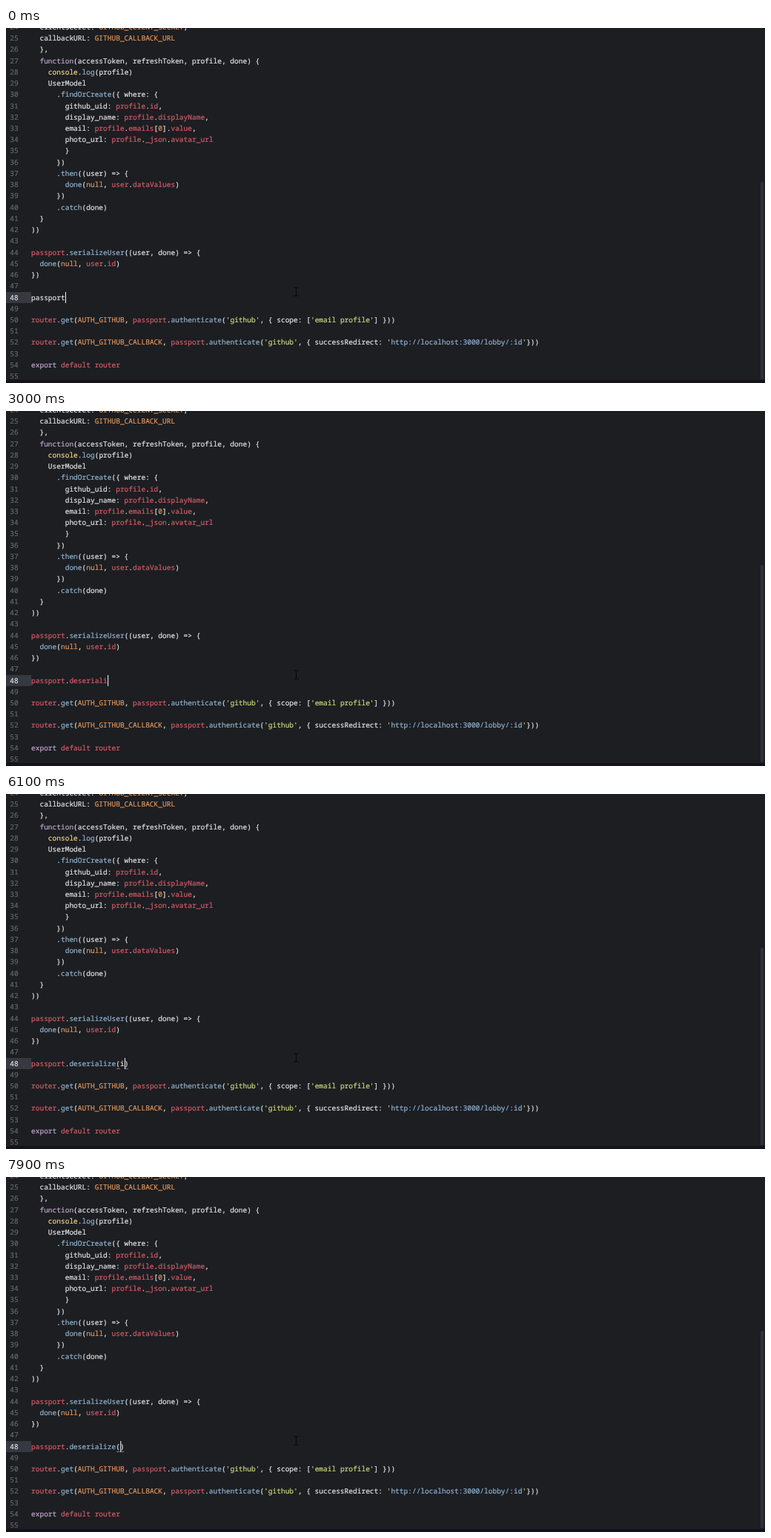
Recreate the animation shown at these times as an HTML page. Size 1024 by 480 pixels, loop 8 s.

```html
<!DOCTYPE html>
<html lang="en">
<head>
<meta charset="utf-8">
<title>Code editor</title>
<style>
  html, body { margin: 0; width: 100%; height: 100%; overflow: hidden; background: #1c1e22; }
  svg { display: block; width: 1024px; height: 480px; }
  text {
    font: 9.525px "Noto Sans Mono", "DejaVu Sans Mono", monospace;
    font-variant-ligatures: none;
    text-rendering: geometricPrecision;
    white-space: pre;
    color: #dfe1e2;
  }
  text, tspan { fill: currentColor; stroke: currentColor; stroke-width: 0.22px; }
  .num { color: #62666d; }
  .num.current { color: #d8dadd; }
  .const { color: #e0945a; }
  .keyword { color: #bfa3c8; }
  .global { color: #f0d080; }
  .call { color: #90b1cb; }
  .name { color: #d05a66; }
  .string { color: #cbd47a; }
  .url { color: #8fb0d0; }
  .match { font-weight: 700; color: #fff; }
  .hint { font-size: 9px; color: #8d9096; }
</style>
</head>
<body>
<svg viewBox="0 0 1024 480">
  <rect width="1024" height="480" fill="#1c1e22"/>
  <rect y="357" width="34" height="15" fill="#36393f"/>
  <g id="code"></g>
  <g id="brackets" fill="#767a80">
    <rect x="148.8" y="371" width="5" height="1"/>
    <rect id="closing" y="371" width="5" height="1"/>
  </g>
  <rect id="caret" y="357" width="1.1" height="15" fill="#e6e8ea"/>
  <g id="popup">
    <rect x="127" y="373" width="159" height="18" fill="#2c2f35"/>
    <rect x="127" y="373" width="20" height="18" fill="#3e4335"/>
    <path d="M132 381h4v-3l4.5 4-4.5 4v-3h-4zM141.5 378.5h1.5v7h-1.5z" fill="#aab45f"/>
    <text x="154.3" y="385.3"><tspan class="match">id</tspan>ea</text>
    <text class="hint" x="224" y="385.3">idea</text>
  </g>
  <path d="M388.5 350.5q3 0 3 2v8q0 2-3 2M394.5 350.5q-3 0-3 2v8q0 2 3 2" fill="none" stroke="#050506"/>
  <rect x="1018" y="208" width="4" height="267" rx="2" fill="#303338"/>
  <rect y="476" width="1024" height="4" fill="#15121a"/>
</svg>
<script>
const LOOP = 8000, LEFT = 34, CHAR = 5.715, ROW = 15.235;
const FIRST = 24, ACTIVE = 48, ACTIVE_BASE = 367.5;

const source = `  clientSecret: GITHUB_CLIENT_SECRET,
  callbackURL: GITHUB_CALLBACK_URL
  },
  function(accessToken, refreshToken, profile, done) {
    console.log(profile)
    UserModel
      .findOrCreate({ where: {
        github_uid: profile.id,
        display_name: profile.displayName,
        email: profile.emails[0].value,
        photo_url: profile._json.avatar_url
        }
      })
      .then((user) => {
        done(null, user.dataValues)
      })
      .catch(done)
  }
))

passport.serializeUser((user, done) => {
  done(null, user.id)
})



router.get(AUTH_GITHUB, passport.authenticate('github', { scope: ['email profile'] }))

router.get(AUTH_GITHUB_CALLBACK, passport.authenticate('github', { successRedirect: 'http://localhost:3000/lobby/:id'}))

export default router
`.split("\n");

const tokens = new RegExp([
  "(?<url>(?<=')http[^']*)",
  "(?<string>'(?!http)[^']*'|')",
  "(?<const>[A-Z]+_[A-Z_]+|\\bnull\\b|\\b0\\b)",
  "(?<keyword>\\b(?:function|export)\\b)",
  "(?<global>\\bconsole\\b)",
  "(?<call>\\w+(?=\\())",
  "(?<name>\\b(?:passport|router|profile|user)(?=\\.)|(?<=\\.)\\w+|default router)"
].join("|"), "g");

function highlight(line) {
  return line.replace(tokens, (match, ...rest) => {
    const groups = rest[rest.length - 1];
    const kind = Object.keys(groups).find(key => groups[key]);
    return `<tspan class="${kind}">${match}</tspan>`;
  });
}

const $ = id => document.getElementById(id);

$("code").innerHTML = source.map((line, i) => {
  const row = FIRST + i;
  const y = (ACTIVE_BASE + (row - ACTIVE) * ROW).toFixed(2);
  const current = row === ACTIVE ? " current" : "";
  return `<text class="num${current}" x="5.3" y="${y}">${row}</text>` +
    `<text id="line${row}" x="${LEFT}" y="${y}">${highlight(line)}</text>`;
}).join("");

const typed = "passport.deserialize(id";
const OPEN = typed.indexOf("(");

// [time, characters before the caret]
const keys = [
  [0, 8], [300, 9], [800, 10], [1000, 11], [1200, 12], [1300, 13],
  [1600, 14], [1900, 15], [2200, 16], [2500, 17], [2800, 18],
  [3100, 19], [3300, 20], [5100, 21], [6100, 22], [6300, 23],
  [7800, 22], [7900, 21]
];
const caretOff = [[3800, 4200], [4600, 5000], [5400, 5800], [6600, 6900], [7300, 7700]];
const popupOn = [6400, 7800];

const within = (t, [from, to]) => t >= from && t < to;
const show = (id, on) => $(id).setAttribute("visibility", on ? "visible" : "hidden");
let shown = -1;

function setLength(count) {
  if (count === shown) return;
  shown = count;
  const inCall = count > OPEN;
  const x = LEFT + count * CHAR;
  $("line" + ACTIVE).innerHTML = highlight(typed.slice(0, count) + (inCall ? ")" : ""));
  $("caret").setAttribute("x", x + 0.2);
  $("closing").setAttribute("x", x + 0.4);
  show("brackets", inCall);
}

function draw(t) {
  setLength(keys.filter(([time]) => time <= t).pop()[1]);
  show("caret", !caretOff.some(span => within(t, span)));
  show("popup", within(t, popupOn));
}

const start = performance.now();
function tick() {
  draw((performance.now() - start) % LOOP);
  requestAnimationFrame(tick);
}
draw(0);
requestAnimationFrame(tick);
</script>
</body>
</html>
```
